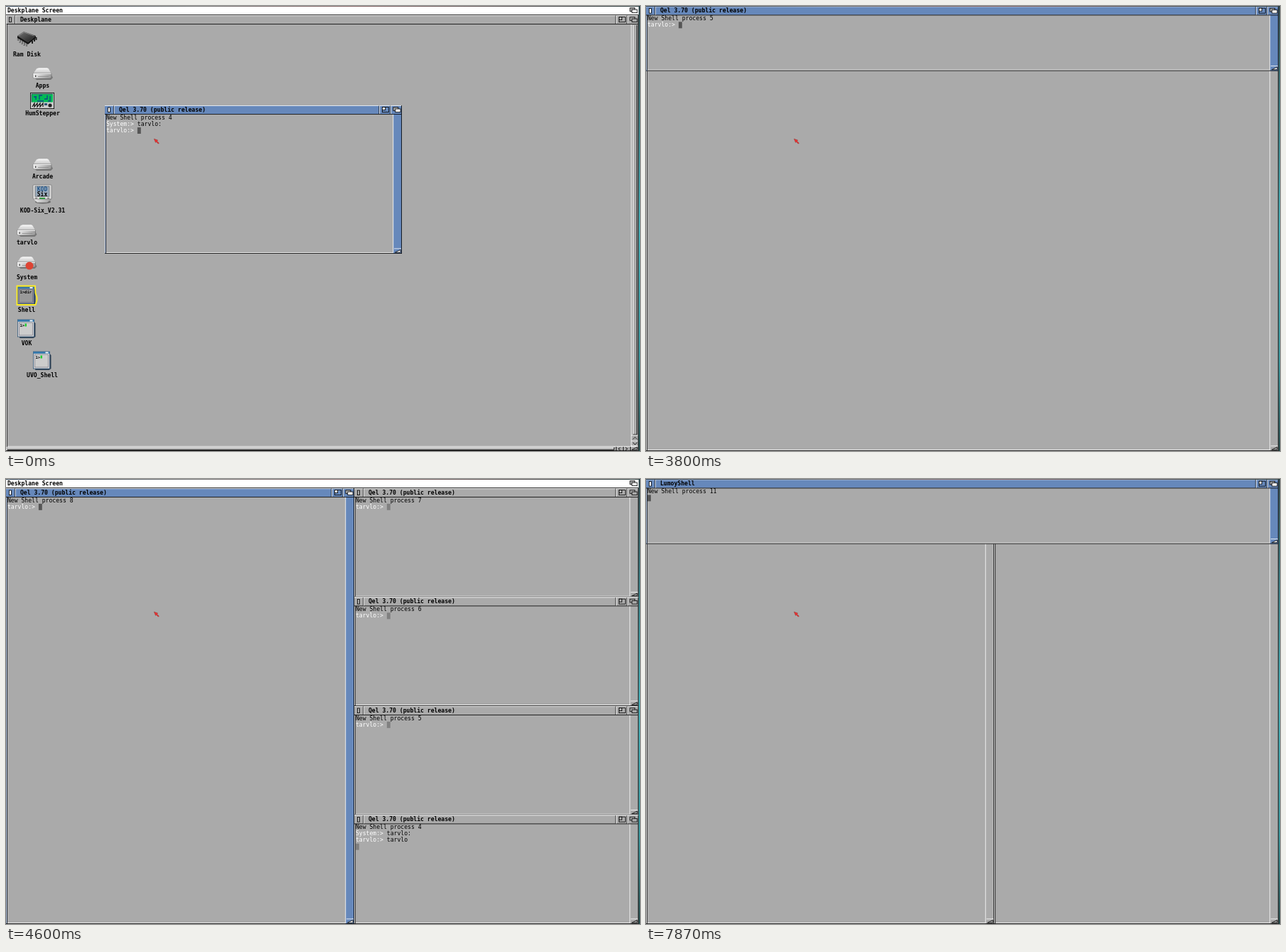
Recreate the animation shown at these times as an HTML page. Size 892 by 627 pixels, loop 8 s.

```html
<!DOCTYPE html>
<html lang="en">
<head>
<meta charset="utf-8">
<title>Tiling desktop</title>
<style>
html, body { margin: 0; width: 100%; height: 100%; overflow: hidden; background: #aaa; }
svg { display: block; width: 892px; height: 627px; }
text { font: 8.1px "DejaVu Sans Mono", "Liberation Mono", monospace; white-space: pre; }
.bold { font-weight: bold; }
</style>
</head>
<body>
<svg id="stage" viewBox="0 0 892 627" xmlns="http://www.w3.org/2000/svg">
  <defs>
    <linearGradient id="lid" x2="0" y2="1">
      <stop stop-color="#fafafa"/><stop offset="1" stop-color="#c4c4c4"/>
    </linearGradient>
    <linearGradient id="front" x2="1" y2="0">
      <stop stop-color="#eee"/><stop offset="1" stop-color="#999"/>
    </linearGradient>
    <linearGradient id="chip" x2="1" y2="1">
      <stop stop-color="#777"/><stop offset="1" stop-color="#181818"/>
    </linearGradient>
    <linearGradient id="topEdge">
      <stop stop-color="#345"/><stop offset=".3" stop-color="#777"/>
      <stop offset=".55" stop-color="#866"/><stop offset="1" stop-color="#344"/>
    </linearGradient>
    <linearGradient id="sideEdge" x2="0" y2="1">
      <stop stop-color="#243c40"/><stop offset=".2" stop-color="#2a6a70"/>
      <stop offset=".5" stop-color="#38a8b0"/><stop offset=".8" stop-color="#2c8c92"/>
      <stop offset="1" stop-color="#163a3a"/>
    </linearGradient>
  </defs>
  <g id="screen"></g>
  <rect width="892" height="1" fill="url(#topEdge)"/>
  <rect x="890.300" width="1.700" height="627" fill="url(#sideEdge)"/>
  <path d="M208.300 187.200L213.600 189.100L212.500 190.300L215.300 193.200L214.300 194.200L211.500 191.400L210.500 192.400Z"
    fill="#e33" stroke="#722" stroke-width=".4"/>
</svg>
<script>
const GREY = '#aaa', BLUE = '#68b', BLACK = '#000', WHITE = '#fff';
const CHAR = 4.876, LINE = 9.15, RIGHT = 890, BOTTOM = 627, BAR = 13, HAIR = .8;
const LOOP = 8000, COMMAND = 'tarvlo', SHELL_TITLE = 'Qel 3.70 (public release)';

const rect = (x, y, w, h, fill, extra = '') =>
  `<rect x="${x}" y="${y}" width="${w}" height="${h}" fill="${fill}" ${extra}/>`;
const hline = (x, y, w, fill) => rect(x, y, w, HAIR, fill);
const vline = (x, y, h, fill) => rect(x, y, HAIR, h, fill);
const outline = (x, y, w, h, fill) =>
  rect(x + HAIR / 2, y + HAIR / 2, w - HAIR, h - HAIR, fill, `stroke="#000" stroke-width="${HAIR}"`);
const poly = (points, fill, extra = '') => `<polygon points="${points}" fill="${fill}" ${extra}/>`;
const path = (d, stroke, width = 1) =>
  `<path d="${d}" fill="none" stroke="${stroke}" stroke-width="${width}"/>`;
const escape = s => s.replace(/>/g, '&gt;');
const text = (x, y, s, extra = '') => `<text x="${x}" y="${y}" ${extra}>${escape(s)}</text>`;
const at = (x, y, content) => `<g transform="translate(${x} ${y})">${content}</g>`;

const depthGadget = (right, y, lit) =>
  outline(right - 12.5, y + 2.3, 7.7, 5.5, lit ? GREY : 'none')
  + outline(right - 9.6, y + 4.6, 8, 5.4, lit ? WHITE : GREY);

const sizeGadget = (right, bottom, lit) =>
  hline(right - 11, bottom - 7.5, 10, WHITE)
  + poly([right - 9.5, bottom - 1.8, right - 2, bottom - 5.5, right - 2, bottom - 1.8],
    lit ? WHITE : GREY, `stroke="#000" stroke-width="${HAIR}"`);

function titleBar(x, y, w, title, active) {
  const right = x + w, lit = active ? WHITE : GREY;
  const divider = dx => vline(dx, y + .5, 11.5, BLACK) + vline(dx + HAIR, y + .5, 11.5, WHITE);
  return rect(x, y, w, 12, active ? BLUE : GREY)
    + hline(x, y, w, WHITE) + hline(x, y + 12, w - 1, BLACK)
    + outline(x + 4, y + 2.6, 3.8, 7.4, lit)
    + divider(x + 12) + divider(right - 32.5) + divider(right - 16.5)
    + outline(right - 28, y + 2.2, 9.8, 7.8, active ? BLUE : GREY)
    + outline(right - 28, y + 2.2, 5, 4.8, lit)
    + depthGadget(right, y, active)
    + text(x + 20, y + 8.6, title, 'class="bold"');
}

// Each line is a pair: white prompt, black text.
function shellWindow({ x, y, w, h, title = SHELL_TITLE, lines, active }) {
  const right = x + w, bottom = y + h, frame = active ? BLUE : GREY;
  const lineTop = i => y + 12.7 + i * LINE;
  const [prompt, typed] = lines[lines.length - 1];
  const body = lines.map(([p, s], i) =>
    `<text x="${x + 2}" y="${lineTop(i) + 6.9}"><tspan fill="#fff">${escape(p)}</tspan>${escape(s)}</text>`);
  return rect(x, y, w, h, GREY)
    + rect(x, y, 2, h, frame) + rect(right - 12, y, 12, h, frame)
    + rect(x, y, .6, h, WHITE) + rect(x + 1.3, y + 12, .7, h - 13, BLACK)
    + vline(right - 12.6, y + 12, h - 13, WHITE)
    + hline(x + 2, bottom - 1.8, w - 14, WHITE)
    + titleBar(x, y, w, title, active)
    + vline(right - HAIR, y, h, BLACK) + hline(x, bottom - HAIR, w, BLACK)
    + sizeGadget(right, bottom, active)
    + body.join('')
    + rect(x + 2 + (prompt + typed).length * CHAR, lineTop(lines.length - 1), CHAR, 9,
      active ? '#555' : '#808080');
}

const greeting = n => ['', `New Shell process ${n}`];
const prompt = `${COMMAND}:> `;
const firstShell = typed => [greeting(4), ['System:> ', `${COMMAND}:`], [prompt, typed]];
const shellLines = n => n === 4 ? [...firstShell(COMMAND), ['', '']] : [greeting(n), [prompt, '']];

const screenBar = () => rect(0, 1, RIGHT, 11, WHITE) + hline(0, 12, RIGHT, BLACK)
  + depthGadget(RIGHT, 0, true) + text(2, 8.9, 'Deskplane Screen', 'class="bold"');

// The newest shell takes the left half, the others share the right column.
function tiled([main, ...stack], active = true) {
  const height = BOTTOM - BAR, row = height / stack.length;
  return screenBar()
    + shellWindow({ x: 0, y: BAR, w: stack.length ? 490 : RIGHT, h: height, lines: shellLines(main), active })
    + stack.map((n, i) =>
      shellWindow({ x: 490, y: BAR + i * row, w: 400, h: row, lines: shellLines(n) })).join('');
}

const opened = (n, starting) => shellWindow({
  x: 0, y: .5, w: RIGHT, h: 91, active: true,
  title: starting ? 'LumoyShell' : SHELL_TITLE,
  lines: starting ? [greeting(n), ['', '']] : shellLines(n)
});

const drive = () =>
  poly('3,15 25,9 28,14 25,17 5,17', '#555', 'opacity=".6"')
  + poly('0,8 5,1 8,0 20,0 22,1 26,8', 'url(#lid)', 'stroke="#999" stroke-width=".4"')
  + poly('0,8 26,8 26,14 24,15 2,15 0,14', 'url(#front)', 'stroke="#666" stroke-width=".5"')
  + hline(.5, 8, 25, WHITE) + rect(3, 10.5, 1.3, 2.5, '#444') + hline(7, 12, 15, '#888');

const chip = () =>
  path('M1.500 8V13M4.500 10V15.500M7.500 12V17.500M10.500 14V19.500M13.500 16V21M22 13V17M25 10V14M27.500 8V12', '#222', 2)
  + path('M1 8V13M4 10V15M7 12V17M10 14V19M13 16V21', '#ddd')
  + poly('1,6 10,0 27,6 16,15', 'url(#chip)') + poly('1,6 16,15 27,6 27,9 16,18 1,9', '#151515')
  + path('M3 6L10.500 1L24 6', '#999', .7);

const sequencer = () =>
  outline(0, 0, 34, 23, '#ccc') + rect(2, 2, 30, 11.5, '#0b5')
  + path('M2 13.500V2H32', '#245', .8)
  + path('M5 6H9M8 10V5M13 10V4H17M20 9H24V4M28 5V11M10 12H19M25 12H29', '#148', 1.3)
  + path('M3 20L6 15V20L10 15V20L14 15V20L18 15V20', '#111', 1.2)
  + rect(20, 15, 4, 3, '#357') + '<circle cx="28" cy="18" r="2.600" fill="#222"/>';

const monitor = () =>
  '<ellipse cx="14" cy="24" rx="11" ry="2.500" fill="#666"/>'
  + poly('0,17 26,17 25,21 20,25 6,25 1,21', 'url(#front)', 'stroke="#777" stroke-width=".5"')
  + rect(0, 0, 26, 20, '#ddd', 'rx="1" stroke="#666" stroke-width=".6"')
  + rect(3, 2, 20, 14.5, '#9ab', 'stroke="#555" stroke-width=".6"')
  + text(13, 8.8, 'KOD', 'class="bold" text-anchor="middle" fill="#258" style="font-size:8px"')
  + text(13, 15.5, 'Six', 'class="bold" text-anchor="middle" style="font-size:8px"')
  + rect(9, 18, 8, 2, '#394') + rect(3, 18, 3, 1.5, '#777') + rect(20, 18, 3, 1.5, '#777');

const terminal = selected =>
  poly('22,2 25,5 25,24 22,26 3,26 2,24', '#345')
  + rect(0, 0, 23, 24, selected ? '#889' : '#ddd', 'stroke="#357" stroke-width=".8"')
  + rect(0, 0, 23, 2.8, '#37a') + rect(17, .5, 4, 1.8, WHITE)
  + rect(2, 4, 19, 18, selected ? '#999' : '#ccc', 'stroke="#667" stroke-width=".6"')
  + text(3, 9.5, selected ? '1>dir' : '1>', 'class="bold" style="font-size:5.500px"')
  + (selected ? path('M-1 -1H24.500L25 9L27 15V19L25 25.500H-1Z', '#fe2', 1.8)
    : rect(10, 5.5, 2.5, 4, '#2c3'));

const label = (x, y, s) => text(x, y + 2.9, s, 'class="bold" text-anchor="middle"');
const icons = [
  at(15, 36, chip()), label(29.5, 68, 'Ram Disk'),
  at(38, 87, drive()), label(51.5, 112.5, 'Apps'),
  at(34, 122, sequencer()), label(51.5, 151.5, 'HumStepper'),
  at(38, 215, drive()), label(51.5, 240.5, 'Arcade'),
  at(38, 252, monitor()), label(51.5, 288, 'KOD-Six_V2.31'),
  at(15.5, 308, drive()), label(29.5, 333, COMMAND),
  at(15.5, 353, drive()), '<circle cx="33" cy="366" r="5.500" fill="#d43"/>', label(29.5, 382, 'System'),
  at(16.5, 395.5, terminal(true)), label(29, 428.5, 'Shell'),
  at(16.5, 442, terminal()), label(29, 475, 'VOK'),
  at(38.5, 487, terminal()), label(51, 520, 'UVO_Shell')
].join('');

function buildDesktop() {
  const arrows = path('M882 610.500L885 607.500L888 610.500M882 615L885 618L888 615'
    + 'M864.500 622L861.500 624L864.500 626M871.500 622L874.500 624L871.500 626', BLACK, HAIR);
  return screenBar() + rect(0, BAR, RIGHT, BOTTOM - BAR, GREY)
    + titleBar(0, BAR, RIGHT, 'Deskplane', false)
    + rect(0, BAR, .6, 614, WHITE) + rect(1.3, 25, .7, 596, BLACK)
    + vline(879.4, 26, 595, WHITE)
    + vline(882, 27, 577, WHITE) + vline(887.3, 27, 577, BLACK) + hline(882, 603.5, 6, BLACK)
    + [604.5, 612.5, 620.3].map(y => hline(880, y, 10, WHITE)).join('')
    + hline(2, 620.3, 878, WHITE) + hline(2, 622, 853, WHITE) + hline(2, 625, 853, BLACK)
    + vline(855, 622, 3.8, BLACK)
    + [858, 868, 878].map(x => vline(x, 621, 6, BLACK)).join('')
    + arrows + sizeGadget(RIGHT, BOTTOM, false)
    + vline(RIGHT - HAIR, BAR, 614, BLACK) + hline(0, BOTTOM - HAIR, RIGHT, BLACK)
    + icons;
}

const desktop = buildDesktop();
const floating = lines => desktop
  + shellWindow({ x: 139, y: 140, w: 418, h: 209, lines, active: true });

const scenes = [
  [0, () => floating(firstShell(''))],
  ...[1, 2, 3, 4, 5].map(n => [730 + n * 200, () => floating(firstShell(COMMAND.slice(0, n)))]),
  [2200, () => floating(shellLines(4))],
  [2330, () => tiled([4])],
  [3800, () => tiled([4], false) + opened(5)],
  [4000, () => tiled([6, 5, 4])],
  [4130, () => tiled([6, 5, 4], false) + opened(7)],
  [4330, () => tiled([7, 6, 5, 4], false) + opened(8, true)],
  [4470, () => tiled([7, 6, 5, 4], false) + opened(8)],
  [4600, () => tiled([8, 7, 6, 5, 4])],
  [6470, () => desktop],
  [7530, () => desktop + opened(9)],
  [7670, () => tiled([9])],
  [7870, () => tiled([10, 9], false) + opened(11, true)]
];

const screenGroup = document.getElementById('screen');
let shown = null;

function render(time) {
  const scene = scenes.findLast(([start]) => start <= time);
  if (scene === shown) return;
  shown = scene;
  screenGroup.innerHTML = scene[1]();
}

const origin = performance.now();
function tick() {
  render((performance.now() - origin) % LOOP);
  requestAnimationFrame(tick);
}
tick();
</script>
</body>
</html>
```
